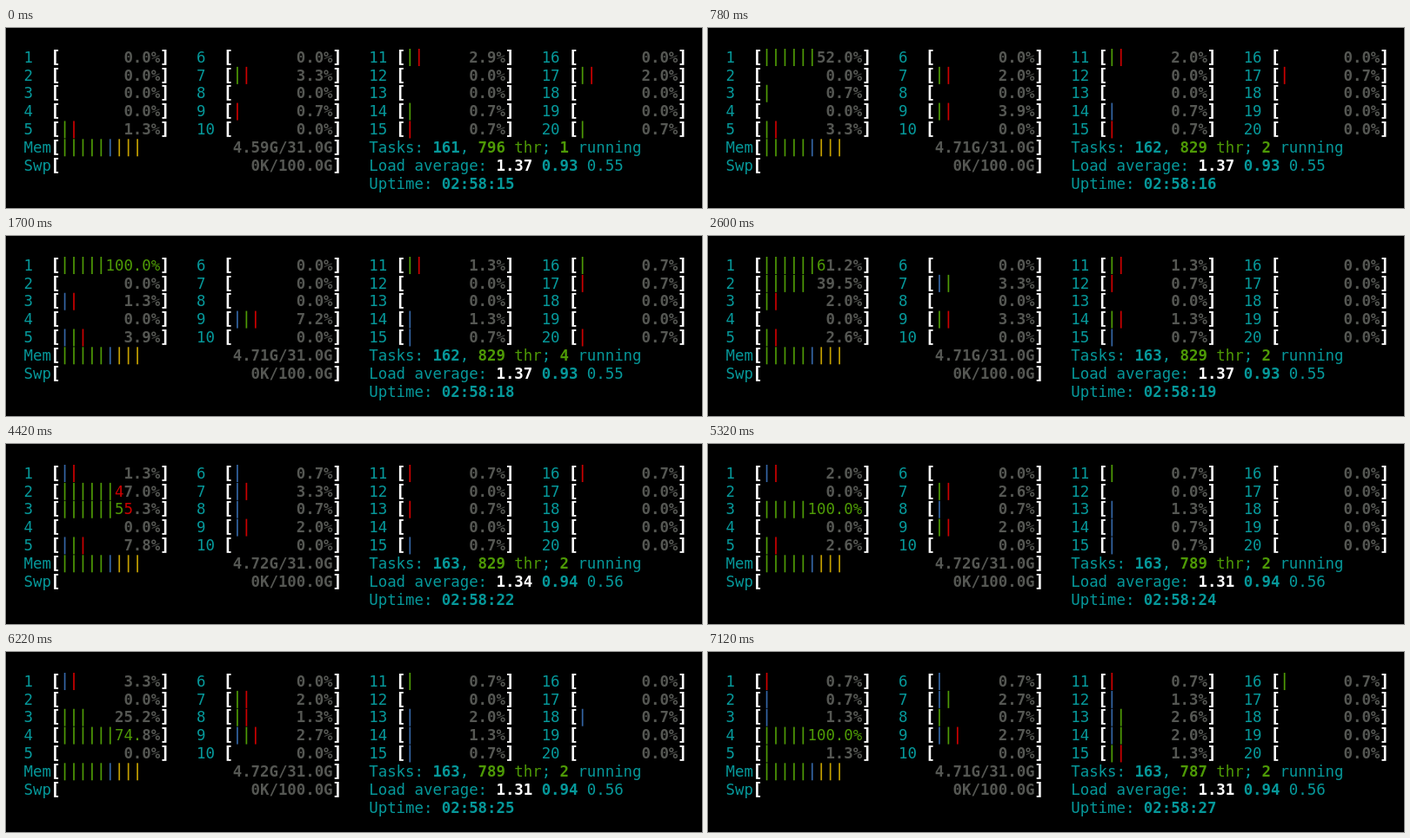
Write an HTML page with a canvas that moves like this. It is 800 px wide and 208 px high and loops after 8 s.

```html
<!DOCTYPE html>
<html lang="en">
<head>
<meta charset="utf-8">
<title>System monitor</title>
<style>
  html, body { margin: 0; height: 100%; overflow: hidden; background: #000; }
  canvas { display: block; }
</style>
</head>
<body>
<canvas id="stage" width="800" height="208"></canvas>
<script>
const ctx = document.getElementById('stage').getContext('2d');
const LOOP = 8000, LEFT = 20.6, BASE = 39.7, CELL = 10.44, LINE = 20.86;
const TEAL = '#06989a', GREEN = '#4e9a06', GRAY = '#555753', WHITE = '#fff';
const BAR = { g: GREEN, r: '#cc0000', b: '#3465a4', y: '#c4a000' };

// Each reading: start ms, busy cores (number, bar colours, percent), memory, tasks, threads, running, loads
const readings = [
  [0, '5gr1.3 7gr3.3 9r0.7 11gr2.9 14g0.7 15r0.7 17gr2.0 20g0.7',
    '4.59', 161, 796, 1, '1.37 0.93 0.55'],
  [780, '1gggggg52.0 3g0.7 5gr3.3 7gr2.0 9gr3.9 11gr2.0 14b0.7 15r0.7 17r0.7',
    '4.71', 162, 829, 2, '1.37 0.93 0.55'],
  [1700, '1ggggggggggg100.0 3br1.3 5bgr3.9 9bgr7.2 11gr1.3 14b1.3 15b0.7 16g0.7 17r0.7 20r0.7',
    '4.71', 162, 829, 4, '1.37 0.93 0.55'],
  [2600, '1ggggggg61.2 2ggggg39.5 3gr2.0 5gr2.6 7bg3.3 9gr3.3 11gr1.3 12r0.7 14gr1.3 15b0.7',
    '4.71', 163, 829, 2, '1.37 0.93 0.55'],
  [3500, '1gr2.0 2ggggggggggg100.0 3gr3.3 4br1.3 5g0.7 6r0.7 7bg6.6 8b1.4 9gr2.7 11bg1.5 12gr1.3 14gr2.0 15gr1.3 19r0.7',
    '4.71', 163, 829, 2, '1.34 0.94 0.56'],
  [4420, '1br1.3 2ggggggr47.0 3gggggggr55.3 5bgr7.8 6b0.7 7br3.3 8b0.7 9br2.0 11r0.7 13r0.7 15b0.7 16r0.7',
    '4.72', 163, 829, 2, '1.34 0.94 0.56'],
  [5320, '1br2.0 3ggggggggggg100.0 5gr2.6 7gr2.6 8b0.7 9gr2.0 11g0.7 13b1.3 14b0.7 15b0.7',
    '4.72', 163, 789, 2, '1.31 0.94 0.56'],
  [6220, '1br3.3 3ggg25.2 4ggggggggg74.8 7gr2.0 8gr1.3 9bgr2.7 11g0.7 13b2.0 14b1.3 15b0.7 18b0.7',
    '4.72', 163, 789, 2, '1.31 0.94 0.56'],
  [7120, '1r0.7 2b0.7 3b1.3 4ggggggggggg100.0 5g1.3 6b0.7 7bg2.7 8g0.7 9bgr2.7 11r0.7 12b1.3 13bg2.6 14bg2.0 15gr1.3 16g0.7',
    '4.71', 163, 787, 2, '1.31 0.94 0.56'],
];

// Writes text on the terminal grid and returns the next free column
function put(col, row, text, color, bold = false, size = 17.4) {
  ctx.font = `${bold ? 'bold ' : ''}${size}px "DejaVu Sans Mono", monospace`;
  ctx.fillStyle = color;
  for (const ch of String(text)) {
    ctx.fillText(ch, LEFT + (col + 0.5) * CELL, BASE + row * LINE);
    col++;
  }
  return col;
}

function putRuns(col, row, runs) {
  for (const [text, color, bold] of runs) col = put(col, row, text, color, bold);
}

// The value sits right-aligned on the bars and takes their colour where they overlap
function meter(col, row, label, width, bars, value) {
  put(col, row, label, TEAL);
  put(col + 3, row, '[', WHITE, true, 20);
  put(col + 4 + width, row, ']', WHITE, true, 20);
  const text = value.padStart(width);
  for (let i = 0; i < width; i++) {
    const color = BAR[bars[i]], x = col + 4 + i;
    if (text[i] !== ' ') {
      put(x, row, text[i], color || GRAY, !color);
    } else if (color) {
      ctx.fillStyle = color;
      ctx.fillRect(LEFT + (x + 0.5) * CELL - 0.85, BASE - 15.7 + row * LINE, 1.7, 20);
    }
  }
}

function draw(index) {
  const [, busy, mem, tasks, threads, running, loads] = readings[index];
  ctx.fillStyle = '#000';
  ctx.fillRect(0, 0, 800, 208);
  ctx.textAlign = 'center';

  const cores = Array.from({ length: 20 }, () => ['', '0.0']);
  for (const [, n, bars, value] of busy.matchAll(/(\d+)([a-z]+)([\d.]+)/g)) {
    cores[n - 1] = [bars, value];
  }
  cores.forEach(([bars, value], i) =>
    meter(19 * Math.floor(i / 5), i % 5, i + 1, 11, bars, value + '%'));

  meter(0, 5, 'Mem', 30, 'gggggbyyy', mem + 'G/31.0G');
  meter(0, 6, 'Swp', 30, '', '0K/100.0G');

  const [one, five, fifteen] = loads.split(' ');
  putRuns(38, 5, [
    ['Tasks: ', TEAL], [tasks, TEAL, true], [', ', TEAL], [threads, GREEN, true],
    [' thr', GREEN], ['; ', TEAL], [running, GREEN, true], [' running', TEAL],
  ]);
  putRuns(38, 6, [
    ['Load average: ', TEAL], [one + ' ', WHITE, true], [five + ' ', TEAL, true], [fifteen, TEAL],
  ]);
  putRuns(38, 7, [
    ['Uptime: ', TEAL], ['02:58:' + (15 + Math.floor(index * 1.5)), TEAL, true],
  ]);
}

let shown = -1;
function tick() {
  const t = performance.now() % LOOP;
  const index = readings.filter(([start]) => start <= t).length - 1;
  if (index !== shown) draw(shown = index);
  requestAnimationFrame(tick);
}
tick();
</script>
</body>
</html>
```
